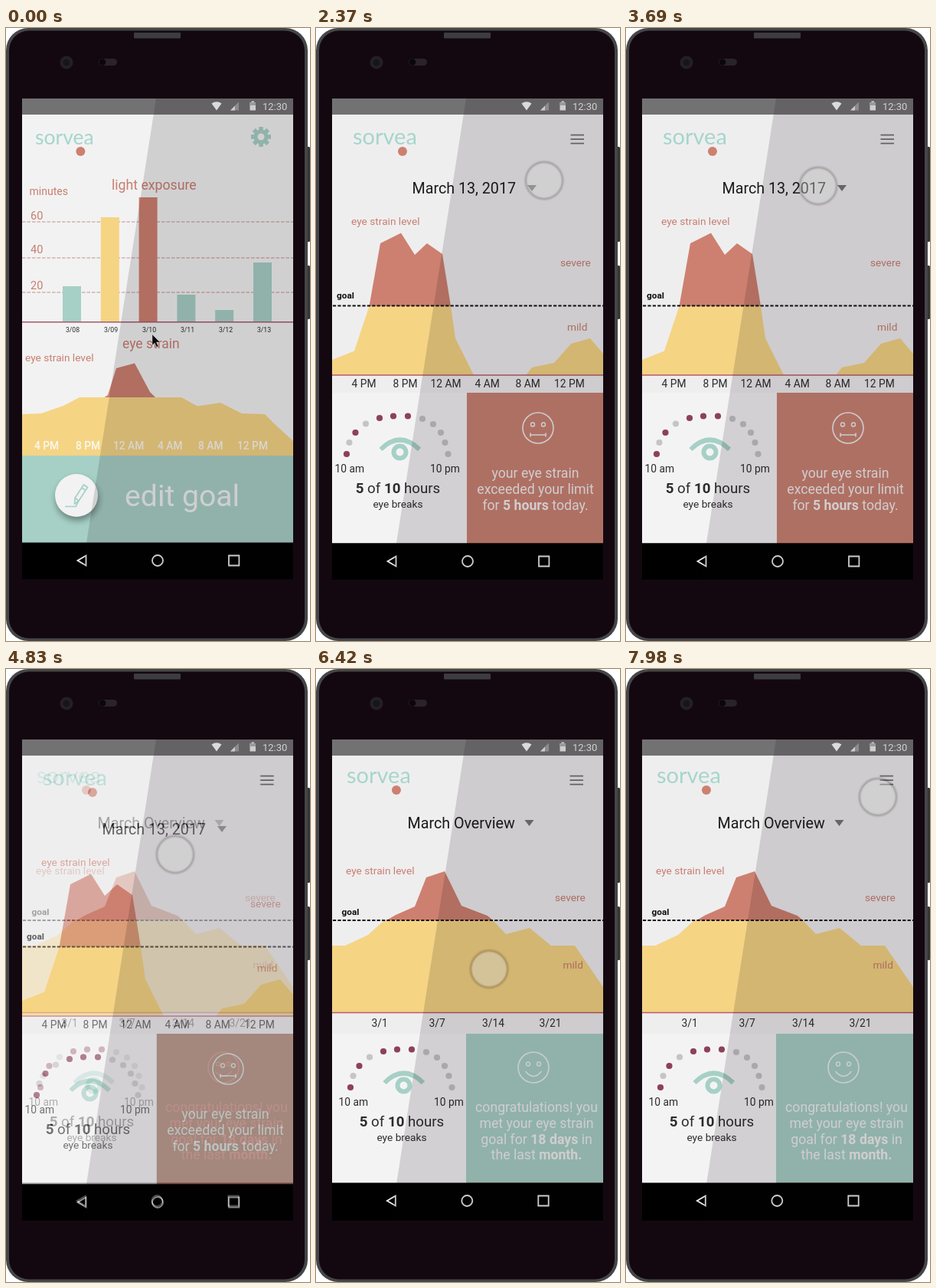
Animation of 397 by 800 pixels, one loop 8 s. Source, as an HTML page:

```html
<!DOCTYPE html>
<html lang="en">
<head>
<meta charset="utf-8">
<title>Eye strain tracker</title>
<style>
  html, body { margin: 0; width: 100%; height: 100%; overflow: hidden; background: #fff; }
  svg { display: block; width: 397px; height: 800px; }
  text { font-family: Roboto, sans-serif; white-space: pre; }
  .logo { font-family: Lato, sans-serif; fill: #a5d6cb; }
  .bold { font-weight: 700; }
  .medium { font-weight: 500; }

  #day { animation: appear 8s step-end infinite; }
  #month { animation: dissolve 8s linear infinite; }
  #touch { animation: appear 8s step-end infinite, travel 8s ease-in-out infinite; }

  @keyframes appear { 0% { opacity: 0 } 14.625%, 100% { opacity: 1 } }
  @keyframes dissolve { 0%, 59.25% { opacity: 0 } 62.5%, 100% { opacity: 1 } }
  @keyframes travel {
    0%, 19.125% { transform: translate(198px, 444px) }
    29.625% { transform: translate(298px, 199px) }
    46.125% { transform: translate(251px, 206px) }
    55%, 72.75% { transform: translate(221px, 242px) }
    88.5% { transform: translate(232px, 567px) }
    99.75%, 100% { transform: translate(329px, 167px) }
  }
</style>
</head>
<body>
<svg id="stage" viewBox="0 0 397 800" xmlns="http://www.w3.org/2000/svg"></svg>
<script>
const TEAL = '#a6d0c6', YELLOW = '#f5d484', RED = '#cd8070', LABEL = '#c87e70',
      BRICK = '#cb8273', MAROON = '#8d4158', PAPER = '#f0f0f0', INK = '#2c2c2c', BODY = '#140810';

const rect = (x, y, w, h, fill, extra = '') =>
  `<rect x="${x}" y="${y}" width="${w}" height="${h}" fill="${fill}" ${extra}/>`;
const circle = (x, y, r, fill, extra = '') =>
  `<circle cx="${x}" cy="${y}" r="${r}" fill="${fill}" ${extra}/>`;
const poly = (points, fill) => `<polygon points="${points}" fill="${fill}"/>`;
const stroke = (d, color, width, extra = '') =>
  `<path d="${d}" fill="none" stroke="${color}" stroke-width="${width}" ${extra}/>`;
const text = (s, x, y, size, fill, anchor = 'start', cls = '') =>
  `<text x="${x}" y="${y}" font-size="${size}" fill="${fill}" text-anchor="${anchor}" class="${cls}">${s}</text>`;
const centered = (s, x, y, size, fill, cls) => text(s, x, y, size, fill, 'middle', cls);
const b = s => `<tspan class="bold">${s}</tspan>`;
const at = (x, y, content) => `<g transform="translate(${x} ${y})">${content}</g>`;
const range = n => [...Array(n).keys()];

const logo = (x, y, size) =>
  `<text x="${x}" y="${y}" font-size="${size}" class="logo">sorvea</text>` +
  circle(x + size * 2.24, y + 9, 6, RED);

const menu = (x, y) => stroke(`M${x} ${y}h17.5m-17.5 5.5h17.5m-17.5 5.5h17.5`, '#747274', 1.8);

const nav = (y, dx) =>
  rect(21, y, 354, 720 - y, '#000') +
  at(dx, y + 23.5,
    stroke('M93.500 0l11-6.500v13z', '#eee', 1.8) +
    circle(198, 0, 7, 'none', 'stroke="#eee" stroke-width="1.8"') +
    stroke('M291-6.500h13.400v13h-13.400z', '#eee', 1.8));

function statusBar() {
  return rect(21, 92, 354, 21, '#737273') +
    `<path d="M268.5 98.5q6.5-4.5 13 0l-6.5 9z" fill="#fff"/>` +
    `<path d="M304 96.5v11h-11z" fill="#a3a2a3"/><path d="M299 101.5v6h-6z" fill="#eee"/>` +
    `<path d="M318.5 97h2v-1.5h3.5v1.5h2v10.5h-7.5z" fill="#f0f0f0"/>` +
    rect(318.5, 97, 7.5, 4, '#b5b4b5') +
    text('12:30', 335, 107, 13, '#f4f4f4');
}

function gear(x, y) {
  const teeth = range(8).map(i => rect(-2.8, -13, 5.6, 6, TEAL, `transform="rotate(${i * 45})"`)).join('');
  return at(x, y, teeth + circle(0, 0, 7, 'none', `stroke="${TEAL}" stroke-width="5"`));
}

function homeScreen() {
  const gridY = [253, 300, 345];
  const bars = [[337, TEAL], [247, YELLOW], [221, RED], [348, TEAL], [368, TEAL], [306, TEAL]];
  const hours = [['4 PM', 37], ['8 PM', 91], ['12 AM', 140], ['4 AM', 198], ['8 AM', 251], ['12 PM', 302]];
  return rect(21, 112, 354, 447, '#f2f2f2') + logo(38, 152, 26.5) + gear(333, 142) +
    text('minutes', 30.5, 218, 14, LABEL) +
    text('light exposure', 138, 211, 17.7, LABEL) +
    gridY.map((y, i) => stroke(`M21 ${y}H375`, '#c58f8b', 1, 'stroke-dasharray="4.5 2"') +
      text(60 - 20 * i, 32, [250, 294, 341][i], 14.5, LABEL)).join('') +
    bars.map(([y, color], i) => rect(74 + 49.8 * i, y, 24, 384 - y, color) +
      centered(`3/${String(8 + i).padStart(2, 0)}`, 87 + 50 * i, 397, 8.7, INK)).join('') +
    stroke('M21 383.700H375', '#a5596a', 1.5) +
    text('eye strain', 152, 418, 17.5, LABEL) +
    text('eye strain level', 25, 435, 13.7, LABEL) +
    poly('127,483 133,479 144,444 168,437.500 188,475 196,483', RED) +
    poly('21,504 46,503 75,493 96,482 229,482 250,493.500 280,489 308,503 338,504 352,518 375,539 375,559 21,559', YELLOW) +
    hours.map(([s, x]) => text(s, x, 550, 13.8, '#fbf8f0', 'start', 'medium')).join('') +
    rect(21, 558, 354, 114, TEAL) +
    circle(93, 615, 28, '#000', 'opacity=".38" filter="url(#soft)"') +
    circle(92, 610, 28, '#f2f2f2') +
    stroke('M77 624.500H91L95 617L106.500 599.500L101.500 596L90 613.500L89.500 621L95 617L90 613.500M99 600L104 603.500', TEAL, 1.7, 'stroke-linejoin="round"') +
    text('edit goal', 155, 624, 39.2, PAPER) +
    nav(671.5, 0) +
    `<path d="M191 400v14l3.200-3 2.500 5.500 2.300-1-2.500-5.500h4.500z" fill="#0b0b0b" stroke="#ddd" stroke-width=".5"/>`;
}

// Arc of hourly dots above the eye, placed for the day screen.
function breaks(dx, dy) {
  const dots = [[40, 556], [43.5, 541], [51.5, 528], [65, 516.5], [83, 509], [101, 506.5],
                [120, 506.5], [139, 510], [153, 517], [163, 528], [168.5, 541], [172.5, 556]];
  const taken = [0, 2, 4, 5, 6];
  return at(dx, dy,
    dots.map(([x, y], i) => circle(x, y, 4.1, taken.includes(i) ? MAROON : '#c5c4c6')).join('') +
    stroke('M84.500 550Q109.500 525 135 550', TEAL, 6) +
    circle(109.5, 553.5, 8, 'none', `stroke="${TEAL}" stroke-width="6"`) +
    text('10 am', 24.5, 580, 13.8, INK) + text('10 pm', 149, 580, 13.8, INK) +
    centered(`${b(5)} of ${b(10)} hours`, 107, 607, 18.7, INK) +
    centered('eye breaks', 107, 626, 13.7, INK));
}

const face = (x, y, mouth) => at(x, y,
  circle(0, 0, 20, 'none', 'stroke="#eee" stroke-width="1.6"') +
  [-7, 7].map(ex => circle(ex, -4.5, 2.5, 'none', 'stroke="#eee" stroke-width="1.4"')).join('') +
  stroke(mouth, '#eee', 1.6));

function report(o) {
  return rect(21, 112, 354, 365, '#efeeef') + logo(o.logo[0], o.logo[1], 29) +
    menu(o.menuX, 139.7) +
    text(o.title, o.titleX, o.titleY, 19.7, '#1c1c1c') +
    poly(`${o.arrow[0]},${o.arrow[1]} ${o.arrow[0] + 12},${o.arrow[1]} ${o.arrow[0] + 6},${o.arrow[1] + 8}`, '#777577') +
    o.yellow.map(p => poly(p, YELLOW)).join('') + poly(o.red, RED) +
    stroke(`M21 ${o.axis}H375`, '#bb5a68', 1.6) +
    stroke(`M22 ${o.goal}H375`, '#111', 2, 'stroke-dasharray="4.2 2.2"') +
    text('eye strain level', ...o.level, 13.7, LABEL) +
    text('severe', ...o.severe, 13.7, LABEL) +
    text('mild', ...o.mild, 13.7, LABEL) +
    text('goal', ...o.goalText, 11.8, '#111', 'start', 'bold') +
    o.ticks.map(([s, x]) => text(s, x, o.tickY, 13.8, INK)).join('') +
    rect(21, 476, 176, o.bottom - 476, '#f4f3f4') + breaks(...o.shift) +
    rect(o.split, 476, 375 - o.split, o.bottom - 476, o.panel) + face(...o.face) +
    o.message.map((s, i) => centered(s, o.messageX, o.messageY + 20.8 * i, 17.7, '#f1efef')).join('') +
    nav(o.bottom, o.navShift);
}

const day = {
  logo: [48, 152], menuX: 332.5, title: 'March 13, 2017', titleX: 125.5, titleY: 216, arrow: [276, 205],
  yellow: ['21,433 50,421.500 69.500,363 176,363 182,405 206,453 21,453',
           '274,453 282,443 311,437 333,412 358,405 375,425 375,453'],
  red: '69.500,363 84,281 111,267.500 129,296 145,281 165,295 176,363',
  axis: 453, goal: 362.6, level: [46, 257], severe: [319, 311], mild: [328, 395], goalText: [27, 353],
  ticks: [['4 PM', 46.5], ['8 PM', 100.5], ['12 AM', 149.5], ['4 AM', 207.5], ['8 AM', 260.5], ['12 PM', 311]],
  tickY: 469, bottom: 672.5, shift: [0, 0], split: 197, panel: BRICK,
  face: [290, 522, 'M-10 9H10M-10 6.500v5M10 6.500v5'],
  message: ['your eye strain', 'exceeded your limit', `for ${b('5 hours')} today.`],
  messageX: 286.5, messageY: 587, navShift: 0
};

const month = {
  logo: [40, 149], menuX: 331.5, title: 'March Overview', titleX: 119.5, titleY: 208, arrow: [272.5, 197],
  yellow: ['21,361 38,361 68,347 89,328 231,328 248,346 279,338 307,361 338,361 347,374 375,415 375,448 21,448'],
  red: '92,328 104,321 129,310 144,272 168,264 190,309 224,322 231,328',
  axis: 448.5, goal: 328, level: [39, 268], severe: [312, 303], mild: [322.5, 391], goalText: [33.5, 321],
  ticks: [['3/1', 72.5], ['3/7', 147.5], ['3/14', 217], ['3/21', 291.5]],
  tickY: 467, bottom: 670.5, shift: [5, -10], split: 196, panel: TEAL,
  face: [284, 520, 'M-10.500 5Q0 18 10.500 5'],
  message: ['congratulations! you', 'met your eye strain', `goal for ${b('18 days')} in`, `the last ${b('month.')}`],
  messageX: 288, messageY: 578, navShift: -.7
};

function phone() {
  return rect(388, 155, 9, 124, '#343536', 'rx="1.5"') + rect(388, 310, 9, 70, '#343536', 'rx="1.5"') +
    rect(0, 0, 394, 800, '#444648', 'rx="29"') +
    rect(4, 3.5, 386, 793, BODY, 'rx="26"') +
    rect(167, 6, 61, 7.5, '#3d3c3e', 'rx="1"') +
    circle(79, 45, 8.5, '#242025') + circle(79, 45, 4.5, '#15161d') +
    rect(121, 40, 24, 9, '#29232a', 'rx="4.5"') + circle(126, 44.5, 4.3, '#0b060a');
}

const touch =
  circle(0, 0, 24, 'none', 'stroke="#000" stroke-width="2.5" opacity=".24" filter="url(#haze)"') +
  circle(0, 0, 22.8, '#f8f7f6', 'opacity=".4"');

document.getElementById('stage').innerHTML = `
  <defs>
    <clipPath id="screen"><rect x="21" y="92" width="354" height="627.5"/></clipPath>
    <filter id="soft" x="-50%" y="-50%" width="200%" height="200%"><feGaussianBlur stdDeviation="4.5"/></filter>
    <filter id="haze" x="-50%" y="-50%" width="200%" height="200%"><feGaussianBlur stdDeviation="1.1"/></filter>
  </defs>
  ${phone()}
  <g clip-path="url(#screen)">
    <g>${homeScreen()}</g>
    <g id="day">${report(day)}</g>
    <g id="month">${report(month)}</g>
    ${statusBar()}
    <g id="touch">${touch}</g>
    <polygon points="196,92 375,92 375,720 97.500,720" fill="${BODY}" opacity=".145"/>
  </g>`;
</script>
</body>
</html>
```
